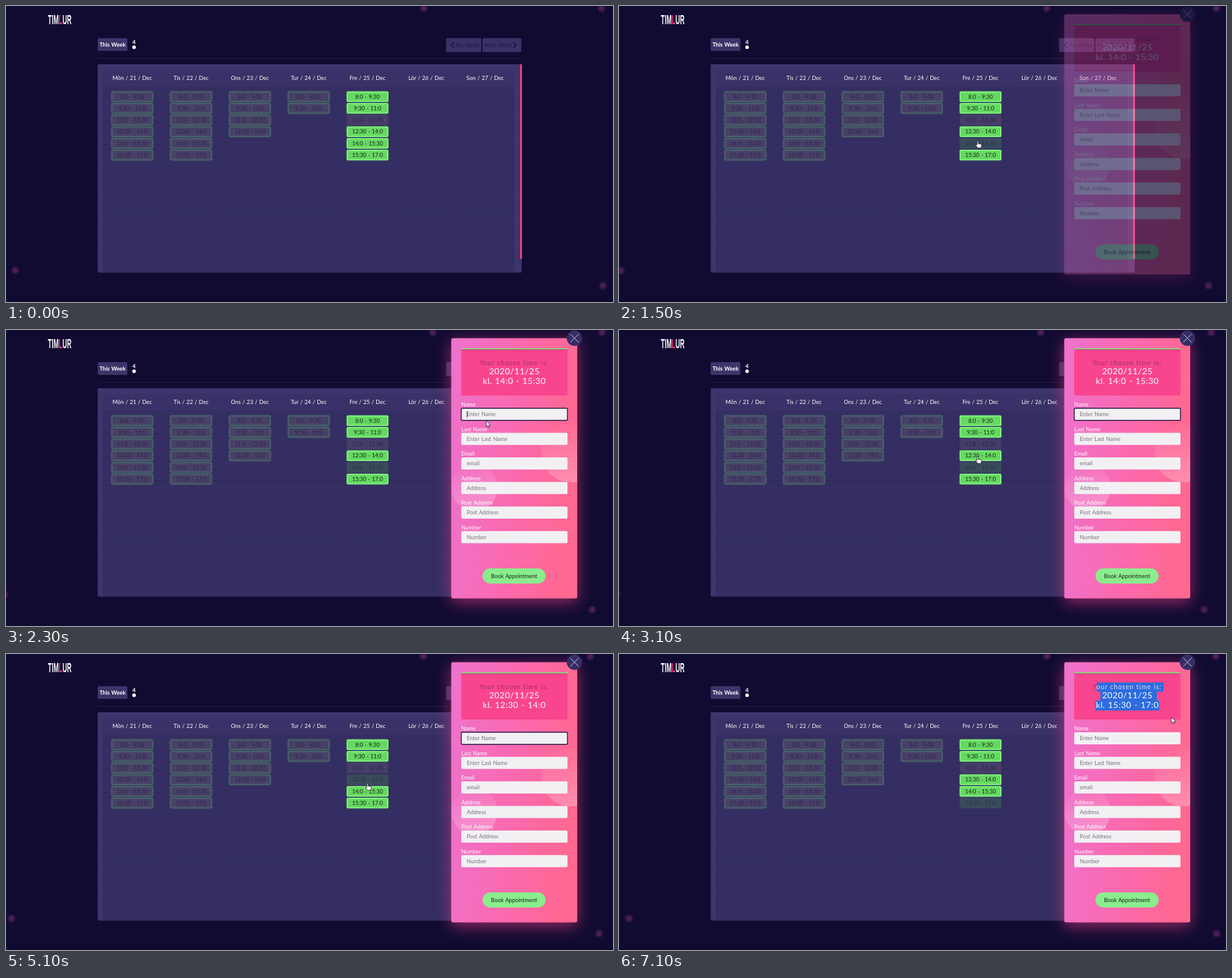
An HTML page that plays this animation: 1000 by 488 pixels, repeating every 7200 ms.

```html
<!DOCTYPE html>
<html lang="en">
<head>
<meta charset="utf-8">
<title>Weekly booking</title>
<style>
  html, body { margin: 0; width: 100%; height: 100%; overflow: hidden; background: #110b32; }
  svg { display: block; width: 1000px; height: 488px; }
  text { font-family: Lato, "Open Sans", sans-serif; font-size: 9.1px; word-spacing: .6px; fill: #fff; }
  .mid { text-anchor: middle; }
  .bold { font-weight: 700; }
  .logo { font: 700 10.3px "Liberation Sans", sans-serif; }
  .dim { fill: #211b41; }
  .hint { fill: #77747c; }
  .dark { fill: #15251b; }
  .date { font-size: 14.1px; letter-spacing: .5px; }
  .lead { font-size: 10.5px; letter-spacing: 1px; fill: #9b2f68; }
  .slot rect { stroke-width: 2; }
  .booked rect { fill: #484067; stroke: #48626a; }
  .booked text { fill: #2b254a; }
  .closed rect { fill: #463e69; stroke: #433b67; }
  .closed text { fill: #292347; }
  .free rect { fill: #66d862; stroke: #80f57d; }
  .free text { fill: #10240f; }
  .picked rect { fill: #3a4b5c; stroke: #394a5c; }
  .picked text { fill: #26324a; }
  .booked, .free { filter: drop-shadow(0 0 1.5px #58a06c70); }
  #panel { filter: drop-shadow(0 6px 13px #ff438b90); }
</style>
</head>
<body>
<svg id="stage" viewBox="0 0 1000 488">
  <defs>
    <linearGradient id="pink" x1="0" y1=".1" x2="1" y2=".25">
      <stop offset="0" stop-color="#ee72cc"/>
      <stop offset=".55" stop-color="#fb69ae"/>
      <stop offset="1" stop-color="#ff6890"/>
    </linearGradient>
    <linearGradient id="bubble" x1=".2" y1="0" x2=".5" y2="1">
      <stop offset=".1" stop-color="#fff" stop-opacity=".03"/>
      <stop offset="1" stop-color="#fff" stop-opacity=".25"/>
    </linearGradient>
    <radialGradient id="glow">
      <stop offset="0" stop-color="#4f2059"/>
      <stop offset=".5" stop-color="#431b52"/>
      <stop offset="1" stop-color="#2a1245" stop-opacity="0"/>
    </radialGradient>
    <clipPath id="card"><rect x="733.5" y="13.5" width="207.5" height="429" rx="3"/></clipPath>
  </defs>
  <rect width="1000" height="488" fill="#110b32"/>
  <g id="dots"></g>
  <g id="page"></g>
  <g id="fade">
    <g id="panel"><rect x="733.5" y="13.5" width="207.5" height="429" rx="3" fill="url(#pink)"/></g>
    <g clip-path="url(#card)" fill="url(#bubble)">
      <circle cx="930" cy="203" r="48"/>
      <circle cx="772" cy="260" r="38"/>
    </g>
    <g id="form"></g>
  </g>
  <g id="cursor" stroke="#161222" stroke-width=".8" stroke-linejoin="round" fill="#fff">
    <path id="arrow" d="M0 0V10L2.3 8 3.9 11.4 5.4 10.7 3.9 7.4H7Z"/>
    <path id="hand" d="M-1 1Q0-.5 1 1V5L5.2 5.7Q6.5 6 6.2 7.5L5.5 12H0L-3.3 7.6Q-3.5 6-2 6.3L-1 7.2Z"/>
    <path id="beam" fill="none" stroke-width="1" d="M-2-5Q0-5 0-3.5V3.5Q0 5-2 5M2-5Q0-5 0-3.5M0 3.5Q0 5 2 5"/>
  </g>
</svg>
<script>
const $ = id => document.getElementById(id);
const LOOP = 7200, STEP = 100;

function add(parent, tag, attrs, content) {
  const node = document.createElementNS('http://www.w3.org/2000/svg', tag);
  for (const key in attrs) node.setAttribute(key, attrs[key]);
  if (content) node.textContent = content;
  return parent.appendChild(node);
}
const box = (p, x, y, width, height, fill, rx = 0) => add(p, 'rect', { x, y, width, height, fill, rx });
const label = (p, x, y, text, cls = '') => add(p, 'text', { x, y, class: cls }, text);
const line = (p, d, stroke, width = 1) => add(p, 'path', { d, stroke, 'stroke-width': width, fill: 'none' });
const show = (node, on) => node.setAttribute('visibility', on ? 'visible' : 'hidden');

const page = $('page'), form = $('form');

// Header
const logo = add(page, 'text', { class: 'logo', transform: 'translate(69 30) scale(1 2.2)' }, 'TIM');
add(logo, 'tspan', { fill: '#ff2f78' }, 'L');
add(logo, 'tspan', {}, 'UR');
box(page, 151, 53, 49, 21, '#3d3469', 2);
label(page, 175.5, 66.5, 'This Week', 'mid bold');
label(page, 211, 62.5, '4', 'mid bold');
add(page, 'circle', { cx: 211, cy: 68, r: 2.9, fill: '#fff' });
box(page, 725, 53, 58, 23, '#3a3166', 2);
box(page, 785, 53, 64, 23, '#3a3166', 2);
label(page, 760, 67.5, 'Pre Week', 'mid dim');
label(page, 811, 67.5, 'Next Week', 'mid dim');
line(page, 'M738 60L734 64.5 738 69M836 60L840 64.5 836 69', '#16102f', 1.5);
line(page, 'M151 86.5H850', '#231b45');

// Calendar
box(page, 151, 96, 698.5, 343.5, '#3d356c', 2);
box(page, 159, 105, 679, 28, '#393167');
box(page, 159, 133, 679, 306, '#342e62');
for (let y = 152; y < 438; y += 19.25) line(page, `M159 ${y}H838`, '#2e285b', .8);
for (let i = 1; i < 7; i++) line(page, `M${159.5 + i * 97} 133V439`, '#393267');
box(page, 847, 96, 3, 321, '#fb3d7d', 1);

const HOURS = ['8:0 - 9:30', '9:30 - 11:0', '11:0 - 12:30', '12:30 - 14:0', '14:0 - 15:30', '15:30 - 17:0'];
const DAYS = ['Mön', 'Tis', 'Ons', 'Tur', 'Fre', 'Lör', 'Son'];
const COUNTS = [6, 6, 4, 2, 6, 0, 0];
const slotY = row => 149.5 + row * 19.25;
let friday = [];

DAYS.forEach((day, col) => {
  const x = 208 + col * 96.9;
  label(page, x, 121.7, `${day} / ${21 + col} / Dec`, 'mid');
  const slots = HOURS.slice(0, COUNTS[col]).map((hours, row) => {
    const g = add(page, 'g', { class: 'slot booked' });
    box(g, x - 33.4, slotY(row) - 7.7, 66.8, 15.4, '', 1);
    label(g, x, slotY(row) + 3.2, hours, 'mid');
    return g;
  });
  if (col === 4) friday = slots;
});

// Booking form
box(form, 750, 30, 175, 78, '#f9458d');
box(form, 750, 30, 175, 2, '#8bd77e');
line(form, 'M750 32.4H925', '#a0446a', .7);
const marks = [[787, 47, 110], [793, 62, 93], [785, 77, 105]]
  .map(([x, y, w]) => box(form, x, y, w, y === 77 ? 16 : 15, '#2c6cdf'));
const lead = label(form, 837, 58, 'Y', 'mid lead');
const leadRest = add(lead, 'tspan', {}, 'our chosen time is:');
label(form, 837.5, 73.3, '2020/11/25', 'mid date');
const chosen = label(form, 837.5, 89.3, '', 'mid date');

const fields = ['Name', 'Last Name', 'Email', 'Address', 'Post Address', 'Number'].map((name, i) => {
  const y = 129 + i * 40.5;
  const hint = name === 'Email' ? 'email' : (i < 2 ? 'Enter ' : '') + name;
  label(form, 750, y - 2.8, name);
  const input = box(form, 750, y, 175, 20, '#f2f0f3', 2);
  label(form, 759, y + 13.3, hint, 'hint');
  return input;
});
const caret = line(form, 'M759.5 134V144.5', '#222', .8);
box(form, 785, 393, 104, 25, '#8bec8d', 12.5);
label(form, 837, 408.8, 'Book Appointment', 'mid dark');
add(form, 'circle', { cx: 936.5, cy: 13.5, r: 12.7, fill: '#352e66' });
line(form, 'M929.5 6.5L943.5 20.5M943.5 6.5L929.5 20.5', '#d0cde3');

// Drifting dots
const dots = [4, 4, 436, 461].map(cy => add($('dots'), 'circle', { cy, r: 8, fill: 'url(#glow)' }));

// Linear time, eased between keys: [ms, ...values]
function track(keys, t) {
  const i = keys.findIndex(k => k[0] > t);
  if (i < 0) return keys[keys.length - 1].slice(1);
  if (i === 0) return keys[0].slice(1);
  const a = keys[i - 1], b = keys[i];
  const p = (t - a[0]) / (b[0] - a[0]), e = p * p * (3 - 2 * p);
  return a.slice(1).map((v, n) => v + (b[n + 1] - v) * e);
}
const DRIFT = [[0, 981], [1000, 986], [1900, 983], [4300, 968], [5300, 962], [6000, 965], [7100, 983]];
const POINTER = [
  [300, 690, 340], [1000, 591, 222], [1500, 591, 222], [1900, 803, 146], [2200, 803, 146],
  [2900, 591, 208], [3700, 591, 208], [4300, 597, 157], [4800, 597, 157], [5300, 595, 243],
  [5700, 595, 243], [6000, 628, 221], [6400, 787, 55], [6600, 787, 55], [7100, 910, 104]
];
const wave = deg => Math.cos(deg * Math.PI / 180);

function pointerKind(x, y, open) {
  const row = Math.round((y - 149.5) / 19.25);
  if (Math.abs(x - 595.5) < 34 && row >= 0 && row < 6 && row !== 2 && Math.abs(y - slotY(row)) < 7) return 'hand';
  const onTitle = x > 784 && x < 892 && y > 47 && y < 93;
  const onField = x > 750 && x < 925 && y > 129 && (y - 129) % 40.5 < 20;
  return open && (onTitle || onField) ? 'beam' : 'arrow';
}

function draw(t) {
  const s = t / 1000;
  const sway = 10.7 * wave(36 + 48.5 * s);
  [694.5 + 10.7 * wave((s - 1.8) * 360 / 5.2), track(DRIFT, t)[0], 6.5 + sway, 974.7 + sway]
    .forEach((x, i) => dots[i].setAttribute('cx', x));

  const picked = t < 1200 ? -1 : t < 3500 ? 4 : t < 5500 ? 3 : 5;
  friday.forEach((g, row) =>
    g.setAttribute('class', 'slot ' + (row === 2 ? 'closed' : row === picked ? 'picked' : 'free')));
  chosen.textContent = picked < 0 ? '' : 'kl. ' + HOURS[picked];
  $('fade').setAttribute('opacity', Math.max(0, Math.min(1, (t - 1280) / 690)));

  const focus = t >= 2000 && t < 6600;
  fields[0].setAttribute('stroke', focus ? '#1b1440' : t >= 1800 && t < 2000 ? '#8b91b5' : 'none');
  fields[0].setAttribute('stroke-width', 1.4);
  show(caret, focus && t % 1000 >= 200 && t % 1000 < 700);
  marks.forEach((m, i) => show(m, t >= 6700 + i * 100));
  leadRest.style.fill = t >= 6700 ? '#e9def5' : '';

  const [x, y] = track(POINTER, t);
  const kind = pointerKind(x, y, t > 1500);
  $('cursor').setAttribute('transform', `translate(${x} ${y})`);
  for (const id of ['arrow', 'hand', 'beam']) show($(id), t >= 300 && id === kind);
}

const start = performance.now();
function tick() {
  const t = (performance.now() - start) % LOOP;
  draw(Math.floor(t / STEP) * STEP);
  requestAnimationFrame(tick);
}
tick();
</script>
</body>
</html>
```
